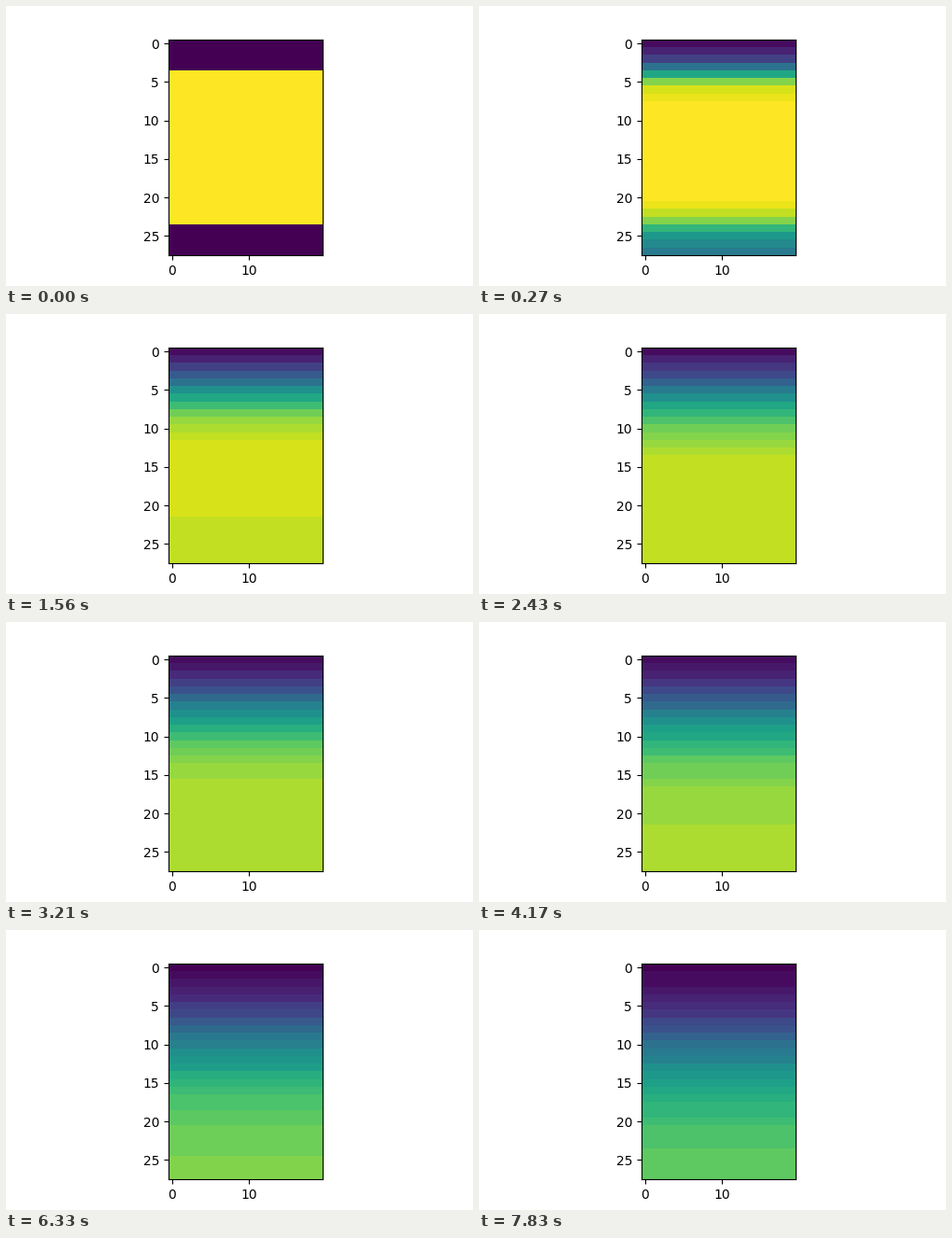
These frames come from a looping animation (500 px wide and 300 px high, 8000 ms). A matplotlib script:

```python
import math

import numpy as np
import matplotlib.pyplot as plt
from matplotlib.animation import FuncAnimation

ROWS, COLS = 28, 20
INTERVAL, FRAMES = 20, 400      # one 8 s loop
STEP_MS = 30                    # the temperature field advances every 30 ms
BANDS = 32                      # temperatures are shown in even colour bands

erf = np.vectorize(math.erf)
rows = np.arange(ROWS, dtype=float)


def front(x, center, width_cold, width_hot):
    """Smooth step from 0 to 1 with its own width on either side."""
    width = np.where(x < center, width_cold, width_hot)
    return 0.5 * (1 + erf((x - center) / np.maximum(width, 1e-6)))


def top_profile(t):
    """Cold front moving down from a cold wall just above the first row."""
    center = 3.35 + 0.027 * t
    cold = min(0.9 * t ** 0.5, 1.35 * t ** 0.315)
    hot = 0.75 * t ** 0.48
    mirrored = -1 - rows
    return front(rows, center, cold, hot) - front(mirrored, center, cold, hot)


def bottom_deficit(t):
    """Cold layer at the insulated end, filling up with heat."""
    depth = ROWS - 0.5 - rows
    edge = 3.52 + 0.005 * t ** 1.6
    width = min(0.75 * t ** 0.5, 1.25 * t ** 0.27)
    amount = 0.97 * math.exp(-0.06 * t) + 0.03 * math.exp(-t / 100)
    return amount * (1 - front(depth, edge, width, width))


def temperature(t):
    heat = math.exp(-0.001 * t) * top_profile(t) * (1 - bottom_deficit(t))
    banded = np.round(heat * BANDS) / BANDS
    return np.repeat(banded[:, None], COLS, axis=1)


fig, ax = plt.subplots(figsize=(5, 3), dpi=100)
image = ax.imshow(temperature(0), cmap="viridis", vmin=0, vmax=1)


def update(frame):
    step = int((frame + 0.5) * INTERVAL // STEP_MS)
    image.set_data(temperature(step))
    return image,


anim = FuncAnimation(fig, update, frames=FRAMES, interval=INTERVAL,
                     repeat=True, repeat_delay=0)
plt.show()
```
